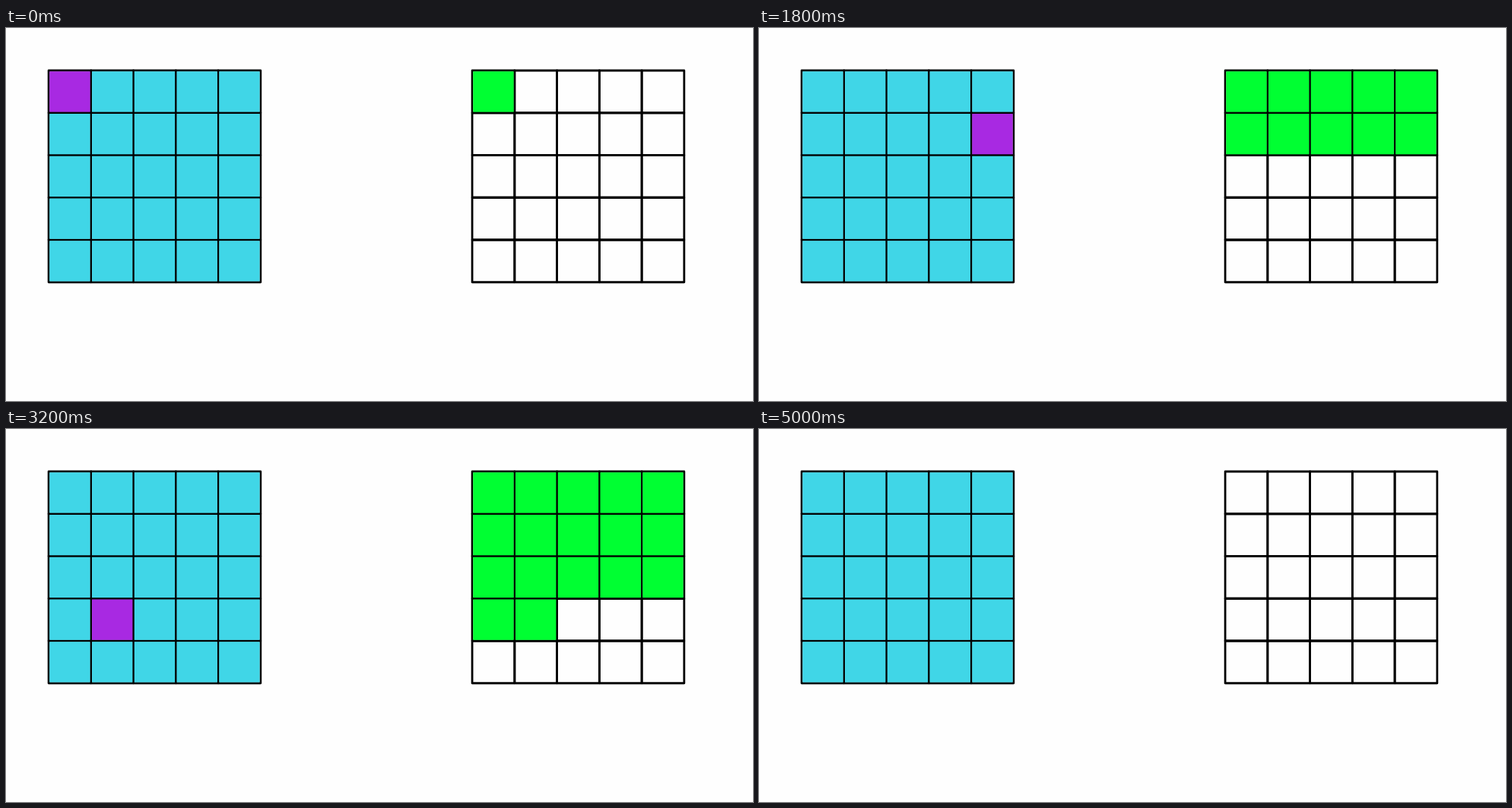
Recreate the animation shown at these times as an HTML page with a canvas. Size 1000 by 500 pixels, loop 5.2 s.

```html
<!DOCTYPE html>
<html lang="en">
<head>
<meta charset="utf-8">
<title>Grid scan</title>
<style>
  html, body { margin: 0; height: 100%; overflow: hidden; background: #fefefe; }
  canvas { display: block; }
</style>
</head>
<body>
<canvas width="1000" height="500"></canvas>
<script>
const ctx = document.querySelector('canvas').getContext('2d');
const SIZE = 5, CELLS = SIZE * SIZE, PITCH = 56.75, TOP = 57, INSET = 1.2;
const STEP_MS = 200, STEPS = CELLS + 1; // the last step clears both grids

function drawGrid(left, colorOf) {
  for (let i = 0; i < CELLS; i++) {
    const x = left + (i % SIZE) * PITCH;
    const y = TOP + Math.floor(i / SIZE) * PITCH;
    ctx.strokeRect(x, y, PITCH, PITCH);
  }
  for (let i = 0; i < CELLS; i++) {
    const color = colorOf(i);
    if (!color) continue;
    const x = left + (i % SIZE) * PITCH;
    const y = TOP + Math.floor(i / SIZE) * PITCH;
    ctx.fillStyle = color;
    ctx.fillRect(x + INSET, y + INSET, PITCH - 2 * INSET, PITCH - 2 * INSET);
  }
}

function draw(time) {
  const step = Math.floor(time / STEP_MS) % STEPS;
  ctx.fillStyle = '#fefefe';
  ctx.fillRect(0, 0, 1000, 500);
  ctx.lineWidth = 2.8;
  ctx.lineJoin = 'round';
  drawGrid(57.1, i => i === step ? '#a829e2' : '#40d6e7');
  drawGrid(624.1, i => step < CELLS && i <= step ? '#00ff32' : null);
  requestAnimationFrame(draw);
}

draw(0);
</script>
</body>
</html>
```
